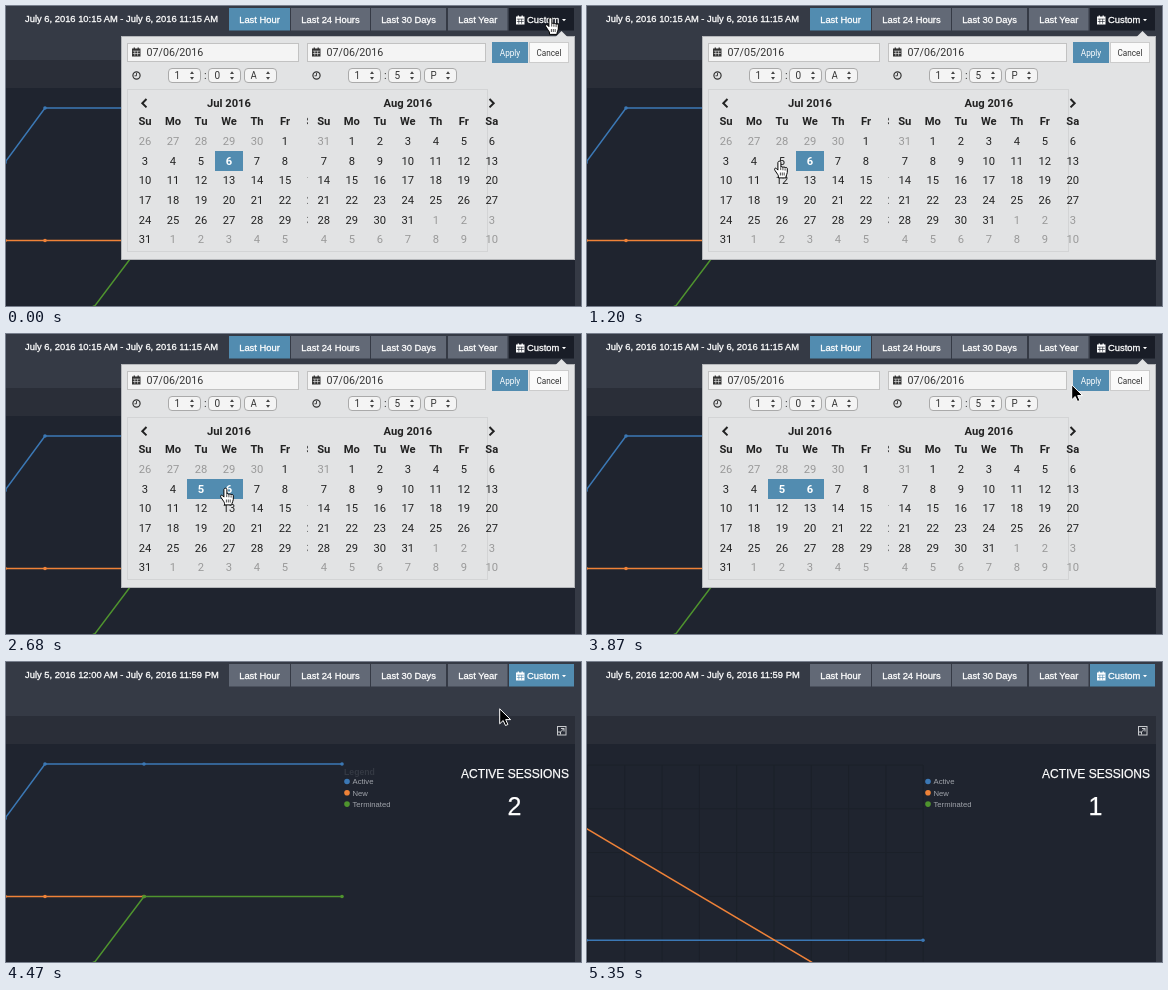
Write an HTML page that moves like this. It is 575x300 px and loops after 5.8 s.

```html
<!DOCTYPE html>
<html lang="en">
<head>
<meta charset="utf-8">
<title>Date range picker</title>
<style>
html, body { margin: 0; width: 100%; height: 100%; overflow: hidden; background: #353a45; }
svg { display: block; }
text { font-family: Roboto, sans-serif; }
.ui { font-family: "Liberation Sans", Arial, sans-serif; }
.top { font-size: 9.4px; fill: #fff; stroke: #fff; stroke-width: .3px; }
.big { fill: #fff; stroke: #fff; stroke-width: .25px; text-anchor: middle; }
.day { font-size: 11.2px; text-anchor: middle; }
.bold { font-weight: bold; }
.input { font-size: 10.7px; fill: #333; }
</style>
</head>
<body>
<svg id="stage" width="575" height="300" viewBox="0 0 575 300"></svg>
<script>
const LOOP = 5800;
const BLUE = '#528cb0', SERIES = ['#3b78b5', '#ef8238', '#4f942e'];
const stage = document.getElementById('stage');

// Each track is a list of [start time, ...values]; the latest entry applies.
const START = [[0, '07/06'], [750, '06/30'], [1050, '07/05'], [2680, '07/06'], [3430, '07/05']];
const END = [[0, '07/06'], [1800, '07/05'], [2250, '07/06']];
const POINTER = [
  [0, 'hand', 539, 11], [600, 'hand', 412, 57], [750, 'hand', 248, 140], [900, 'hand', 233, 144],
  [1050, 'hand', 193, 155], [1200, 'hand', 187, 154.5], [2100, 'hand', 195, 155],
  [2250, 'hand', 207, 154], [2390, 'hand', 213, 154], [2540, 'hand', 214, 153.5],
  [3280, 'hand', 251, 142], [3430, 'arrow', 433, 79], [3580, 'arrow', 445, 78],
  [3720, 'beam', 468, 48], [3870, 'arrow', 484, 50], [4020, 'hand', 488, 49],
  [4170, 'hand', 490, 47.5], [4470, 'arrow', 493, 46], [4910, 'arrow', 485, 165],
  [5050, 'arrow', 507, 238], [5200, 'arrow', 528, 259], [5350, 'none', 0, 0]
];
const at = (track, t) => track.findLast(k => k[0] <= t);

const rect = (x, y, w, h, fill, more = '') =>
  `<rect x="${x}" y="${y}" width="${w}" height="${h}" fill="${fill}" ${more}/>`;
const path = (d, stroke, width = 1, fill = 'none') =>
  `<path d="${d}" stroke="${stroke}" stroke-width="${width}" fill="${fill}"/>`;
const dot = (x, y, r, fill) => `<circle cx="${x}" cy="${y}" r="${r}" fill="${fill}"/>`;
const text = (x, y, s, cls, more = '') => `<text x="${x}" y="${y}" class="${cls}" ${more}>${s}</text>`;

const SHAPES = {
  none: '',
  arrow: path('M.7 .8v15l3.5-3.3 2.3 5 2.4-1-2.2-4.9h4.9z', '#fff', 1, '#000'),
  beam: path('M.5 .5q3 0 3 2.5v11q0 2.5-3 2.5M6.5 .5q-3 0-3 2.5v11q0 2.5 3 2.5M2 9h3', '#222'),
  hand: path('M5.4.7C4.4.7 3.9 1.4 3.9 2.3V9.6L2.5 8.1C1.9 7.4.9 7.6.6 8.3.4 8.9.7 9.5 1.1 10.1L3.6 13.8' +
    'C4.1 14.6 4.5 15.1 4.5 16V17.4H12V16C12 14.8 13.3 13.8 13.3 12V8.2C13.3 6.7 11.3 6.5 11.1 7.5' +
    'C11 6.1 9.1 6 8.9 7.1 8.7 5.8 7.2 5.7 6.9 6.7V2.3C6.9 1.4 6.4.7 5.4.7z', '#000', 1, '#fff') +
    path('M6.7 7v2.6M8.9 7.3v2.5M11.1 7.8v2.3M6.4 12v3M8.3 12v3M10.2 12v3', '#000', .7)
};

function calendarIcon(x, y, ink, paper) {
  return rect(x, y + 1, 8.5, 8, ink) + path(`M${x + 2.3} ${y}v2.5M${x + 6.2} ${y}v2.5`, ink, 1.3) +
    path(`M${x + .8} ${y + 3.6}h7M${x + .8} ${y + 6}h7M${x + 2.8} ${y + 3.4}v4.8M${x + 5.6} ${y + 3.4}v4.8`, paper, .6);
}

function toolbar(t) {
  const open = t < 4470;
  const range = open ? 'July 6, 2016 10:15 AM - July 6, 2016 11:15 AM' : 'July 5, 2016 12:00 AM - July 6, 2016 11:59 PM';
  const buttons = [[223, 61, 'Last Hour'], [285, 79, 'Last 24 Hours'], [365, 75, 'Last 30 Days'], [442, 59.5, 'Last Year']];
  const custom = open ? '#191d27' : BLUE;
  return text(19, 16, range, 'ui top') +
    buttons.map(([x, w, label], i) => rect(x, 2, w, 22.5, open && !i ? BLUE : '#626976') +
      text(x + w / 2, 17, label, 'ui top', 'text-anchor="middle"')).join('') +
    rect(503, 2, 65, 22.5, custom) + calendarIcon(510, 9.5, '#fff', custom) +
    text(521, 17, 'Custom', 'ui top') + path('M556 13h4l-2 2.3z', 'none', 0, '#fff');
}

function line(color, points, marks = points) {
  return path('M' + points.join('L'), color, 1.5) + marks.map(([x, y]) => dot(x, y, 1.8, color)).join('');
}

function sessions(count) {
  return text(509, 116, 'ACTIVE SESSIONS', 'ui big', 'font-size="12"') +
    text(508.5, 153, count, 'ui big', 'font-size="25"');
}

function legend(title) {
  return (title ? text(338, 113, 'Legend', 'ui bold', 'font-size="8.7" fill="#343943"') : '') +
    ['Active', 'New', 'Terminated'].map((name, i) => dot(341, 119.5 + 11.3 * i, 2.8, SERIES[i]) +
      text(346.5, 122.2 + 11.3 * i, name, 'ui', 'font-size="7.7" fill="#a0a4ab"')).join('');
}

function chart(t) {
  const [blue, orange, green] = SERIES;
  if (t < 4910) {
    return line(blue, [[-1, 156.4], [39, 102], [138, 102], [336, 102]]) +
      line(orange, [[-1, 234.5], [39, 234.5], [138, 234.5]]) +
      line(green, [[88, 301], [138, 234.5], [336, 234.5]]) + legend(true) + sessions(2);
  }
  if (t < 5350) return '';
  let grid = '';
  for (let i = 0; i < 10; i++) grid += `M${i * 37.3 + .5} 103V300`;
  for (let i = 0; i < 5; i++) grid += `M0 ${103 + i * 43.8}H336`;
  return path(grid, '#1b2029') + line(blue, [[-1, 278.3], [336, 278.3]]) +
    line(orange, [[-1, 166.4], [226, 301]], []) + legend(false) + sessions(1);
}

function month(x, title, first, before, length, marks, clip) {
  let out = text(x + 84, 100.5, title, 'day bold', 'fill="#222"');
  ['Su', 'Mo', 'Tu', 'We', 'Th', 'Fr', 'Sa'].forEach((d, i) =>
    out += text(x + i * 28, 119, d, 'day bold', 'fill="#222"'));
  for (let i = 0; i < 42; i++) {
    const n = first + i, inside = n > 0 && n <= length;
    const label = n < 1 ? n + before : inside ? n : n - length;
    const cx = x + i % 7 * 28, y = 139 + Math.floor(i / 7) * 19.65;
    const fill = inside && marks[n], active = fill === BLUE;
    if (fill) out += rect(cx - 14, 145, 28, 20, fill);
    out += text(cx, y, label, active ? 'day bold' : 'day', `fill="${active ? '#fff' : inside ? '#222' : '#999'}"`);
  }
  return clip ? `<svg width="${clip}" height="300">${out}</svg>` : out;
}

function select(x, y, w, label) {
  return rect(x, y, w, 14, '#f4f4f4', 'rx="3.5" stroke="#aaa"') +
    `<svg x="${x + 6}" y="${y}" width="6" height="14">${text(0, 10.5, label, '', 'font-size="10" fill="#333"')}</svg>` +
    path(`M${x + 21.5} ${y + 5.6}l2-2.8 2 2.8zM${x + 21.5} ${y + 8.4}l2 2.8 2-2.8z`, 'none', 0, '#444');
}

function field(x, date, selects) {
  return rect(x + .5, 37.5, x < 200 ? 171 : 178, 18, '#f4f4f4', 'stroke="#c2c2c2"') +
    calendarIcon(x + 5, 41.5, '#333', '#f4f4f4') + text(x + 19.5, 50, date + '/2016', 'input') +
    `<circle cx="${x + 9.5}" cy="69.5" r="3.6" fill="none" stroke="#333" stroke-width="1.2"/>` +
    path(`M${x + 9.5} 67v2.8h-2`, '#333', .9) +
    select(x + 41.5, 62.5, 32, selects[0]) + text(x + 77, 73, ':', '', 'font-size="11" fill="#333"') +
    select(x + 81.5, 62.5, 32, selects[1]) + select(x + 117.5, 62.5, 32, selects[2]);
}

function popup(t) {
  const marks = {};
  if (t < 1800 || t >= 2680) marks[6] = BLUE;
  else if (t >= 2250) marks[6] = '#ebf4f8';
  if (t >= 1800) marks[5] = BLUE;
  const waiting = t >= 1800 && t < 2680;
  return rect(115.5, 30.5, 453, 223, '#e2e3e4', 'stroke="#b4b6b9"') +
    path('M549.5 31l6-6 6 6z', 'none', 0, '#e2e3e4') +
    field(121, at(START, t)[1], ['1', '0', 'A']) + field(301, at(END, t)[1], ['1', '5', 'P']) +
    `<g opacity="${waiting ? .65 : 1}">` + rect(486, 36, 36, 21, t >= 4320 ? '#4b7a35' : BLUE) +
    text(504, 49.5, 'Apply', '', 'font-size="8.2" fill="#fff" text-anchor="middle"') + '</g>' +
    rect(523.5, 36.5, 39, 20, '#fafafa', 'stroke="#ccc"') +
    text(543, 49.5, 'Cancel', '', 'font-size="8.2" fill="#333" text-anchor="middle"') +
    rect(121.5, 83.5, 360, 162, 'none', 'stroke="#d3d4d5"') +
    path('M140.5 93l-4.2 4.2 4.2 4.2M483.5 93l4.2 4.2-4.2 4.2', '#222', 2) +
    month(139, 'Jul 2016', -4, 30, 31, marks, 302) + month(317.8, 'Aug 2016', 0, 31, 31, {});
}

function scene(t) {
  const [, kind, x, y] = at(POINTER, t);
  return rect(0, 0, 575, 300, '#353a45') + rect(0, 54, 569, 28, '#2a2e38') + rect(0, 82, 569, 218, '#1f242f') +
    rect(551.5, 64.5, 8.5, 8.5, 'none', 'stroke="#c8cacd"') +
    path('M554 70.5l4-4M555 66.5h3v3M552 70h2.5v2.5', '#c8cacd') +
    chart(t) + toolbar(t) + (t < 4470 ? popup(t) : '') +
    `<g transform="translate(${x} ${y})">${SHAPES[kind]}</g>`;
}

let shown = '';
function frame(now) {
  const next = scene(now % LOOP);
  if (next !== shown) stage.innerHTML = shown = next;
  requestAnimationFrame(frame);
}
frame(0);
</script>
</body>
</html>
```
